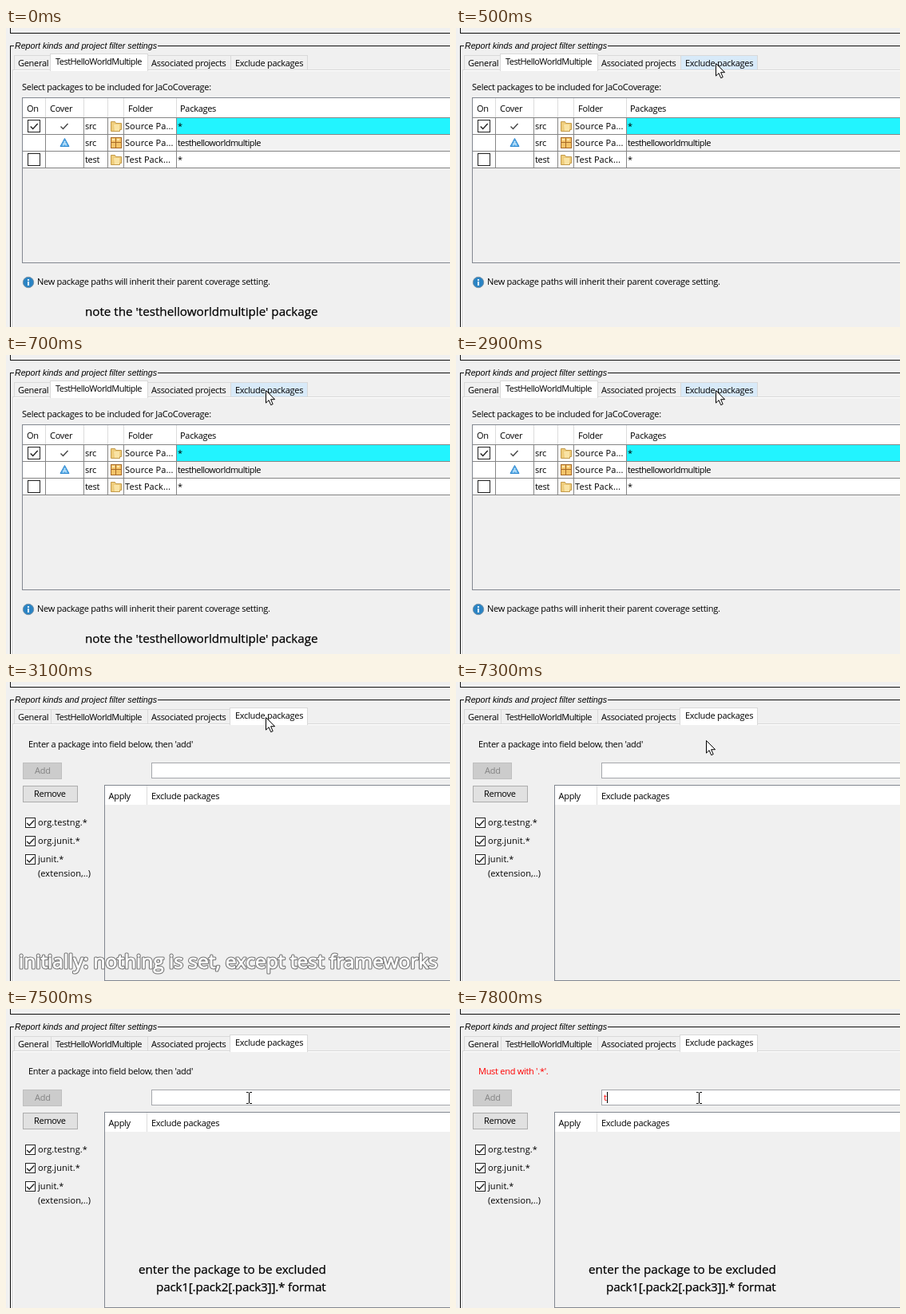
These frames come from a looping animation (556x375 px, 8 s). An HTML page:

```html
<!DOCTYPE html>
<html lang="en">
<head>
<meta charset="utf-8">
<title>Coverage package settings</title>
<style>
  html, body { margin: 0; width: 100%; height: 100%; overflow: hidden; background: #f0f0f0; }
  svg { display: block; }
  rect { shape-rendering: crispEdges; }
  text { font: 11px "Open Sans", "Noto Sans", sans-serif; letter-spacing: -.28px; white-space: pre; }
  .tight { letter-spacing: -.53px; }
  .wide { letter-spacing: .08px; }
  .group { font: italic 10.65px "Liberation Sans", Arial, sans-serif; letter-spacing: 0; }
  .note { font-size: 15.2px; letter-spacing: 0; stroke: #000; stroke-width: .25px; }
  .format { letter-spacing: -.18px; }
  .banner { font-size: 24.5px; letter-spacing: 0; stroke: #fff; stroke-width: .8px; stroke-linejoin: round; }
  .halo { stroke: #777; stroke-width: 3px; }
</style>
</head>
<body>
<svg id="stage" width="556" height="375" viewBox="0 0 556 375"></svg>
<script>
const LOOP = 8000;
const stage = document.getElementById('stage');

const box = (x, y, w, h, fill) => `<rect x="${x}" y="${y}" width="${w}" height="${h}" fill="${fill}"/>`;
const hline = (x, y, x2, color) => box(x, y, x2 - x, 1, color);
const vline = (x, y, y2, color) => box(x, y, 1, y2 - y, color);
const frame = (x, y, w, h, fill, edge) => box(x, y, w, h, edge) + box(x + 1, y + 1, w - 2, h - 2, fill);
const text = (x, y, s, cls = '', fill = '#000') =>
  `<text x="${x}" y="${y}" class="${cls}" fill="${fill}">${s}</text>`;
const path = (d, fill, stroke = 'none', width = 1) =>
  `<path d="${d}" fill="${fill}" stroke="${stroke}" stroke-width="${width}"/>`;

const tick = (x, y, color) => path(`M${x} ${y}l3 3 6-6.5`, 'none', color, 1.4);
const checkbox = (x, y, size, on) =>
  frame(x, y, size, size, '#fff', '#222') + (on ? tick(x + size / 2 - 4.3, y + size / 2 + .5, '#222') : '');

const folder = (x, y) =>
  path(`M${x + .5} ${y + 1.5}h5l1 2h7v8h-2v2h-11z`, '#efcd7c', '#c39a4a') +
  path(`M${x + 4} ${y + 5}h7v8h-6z`, '#f9e3a4');
const parcel = (x, y) =>
  frame(x, y, 14, 14, '#f3c469', '#a86a28') + vline(x + 6, y, y + 14, '#a86a28') +
  hline(x, y + 6, x + 14, '#a86a28') + box(x + 2, y + 2, 3, 2, '#fbe5ae') + box(x + 8, y + 2, 3, 2, '#fbe5ae');

const arrow = (x, y) =>
  path(`M${x + .5} ${y + .5}v15.6l3.6-3.4 2.6 6 2.5-1.1-2.6-5.9h5z`, '#fff', '#000');
const ibeam = (x, y) =>
  path(`M${x - 3} ${y + .5}h2.5l1 1 1-1h2.5M${x + .5} ${y + 1}v13M${x - 3} ${y + 14.5}h2.5l1-1 1 1h2.5`, 'none', '#000');

const tabs = [
  [10, 46, 15, 'General'],
  [56, 121, 62, 'TestHelloWorldMultiple', 'tight'],
  [177, 104, 182, 'Associated projects'],
  [281, 96, 287, 'Exclude packages']
];

function chrome(selected, hovered) {
  const edge = '#d9d9d9';
  let s = box(0, 0, 556, 375, '#f0f0f0') +
    vline(5, 0, 7, '#111') + hline(5, 6, 556, '#111') +
    vline(5, 22, 375, '#111') + hline(5, 22, 10, '#111') + hline(190, 22, 556, '#111') +
    text(11, 26, 'Report kinds and project filter settings', 'group');
  tabs.forEach(([x, w, tx, label, cls], i) => {
    if (i !== selected)
      s += frame(x, 34, w + 1, 19, i === hovered ? '#d8eaf9' : '#f0f0f0', edge) + text(tx, 48, label, cls);
  });
  const [x, w, tx, label, cls] = tabs[selected];
  return s + hline(8, 52, 556, edge) + vline(8, 52, 375, edge) +
    hline(9, 53, 556, '#fff') + vline(9, 53, 375, '#fff') +
    frame(x - 1, 32, w + 2, 22, '#fff', edge) + box(x, 52, w, 2, '#fff') +
    text(tx, 46, label, cls);
}

function includePage() {
  const grid = '#858585', rows = [113, 134, 155];
  let s = text(20, 78, 'Select packages to be included for JaCoCoverage:') +
    box(20, 87, 536, 208, '#828790') + box(21, 88, 535, 206, '#f0f0f0') +
    box(21, 88, 535, 87, '#fff') +
    box(214, 113, 342, 20, '#22f4ff') + box(214, 134, 342, 20, '#f2f2f2');
  for (const x of [49, 97, 127, 147, 213])
    s += vline(x, 88, 112, '#dcdcdc') + vline(x, 112, 175, grid);
  for (const y of [112, 133, 154, 175]) s += hline(21, y, 556, grid);
  [[26, 'On'], [55, 'Cover'], [153, 'Folder'], [218, 'Packages']]
    .forEach(([x, label]) => s += text(x, 105, label));
  [['src', 'Source Pa...', '*'], ['src', 'Source Pa...', 'testhelloworldmultiple'], ['test', 'Test Pack...', '*']]
    .forEach(([root, name, pack], i) => {
      const y = rows[i] + 14;
      s += text(99, y, root) + text(149, y, name, 'wide') + text(215, y, pack, i === 1 ? 'tight' : '') +
        (i === 1 ? parcel : folder)(131, rows[i] + 3);
    });
  return s + checkbox(27, 115, 16, true) + checkbox(27, 157, 16, false) + tick(68.5, 123.5, '#444') +
    path('M73.5 138.5l5.5 10h-11z', '#5fb0e8', '#2b86cf') +
    path('M71 145.5h5M72.5 142.5h2M71.5 148l2-5 2 5', 'none', '#d9efff', .8) +
    '<circle cx="28" cy="319" r="6.7" fill="#2b84c4" stroke="#7793a8"/>' +
    box(27, 315, 2, 2, '#fff') + box(27, 318, 2, 5, '#fff') +
    text(39, 322, 'New package paths will inherit their parent coverage setting.');
}

function excludePage(typed) {
  let s = (typed ? text(28, 82, "Must end with '.*'.", '', '#f00')
                 : text(28, 82, "Enter a package into field below, then 'add'")) +
    frame(21, 101, 49, 21, '#ccc', '#bfbfbf') + text(36, 115, 'Add', '', '#838383') +
    frame(21, 130, 69, 21, '#e1e1e1', '#adadad') + text(35, 144, 'Remove') +
    frame(182, 101, 380, 20, '#fff', '#a5a7ac') +
    frame(123, 129, 440, 246, '#f0f0f0', '#828790') + box(124, 130, 432, 24, '#fff') +
    vline(176, 130, 154, '#dcdcdc') +
    text(128.5, 147, 'Apply') + text(182, 147, 'Exclude packages');
  ['org.testng.*', 'org.junit.*', 'junit.*'].forEach((label, i) =>
    s += checkbox(24, 170 + 23 * i, 13, true) + text(40, 180 + 23 * i, label, 'wide'));
  s += text(40, 244, '(extension,..)', 'wide');
  if (typed) s += text(185, 115, 't', '', '#f00') + vline(189, 104, 118, '#000');
  return s;
}

const banner = ['banner halo', 'banner']
  .map(cls => text(16, 359, 'initially: nothing is set, except test frameworks', cls, '#fff')).join('');
const note = text(99, 361, "note the 'testhelloworldmultiple' package", 'note');
const hint = text(166, 332, 'enter the package to be excluded', 'note') +
  text(188, 354, 'pack1[.pack2[.pack3]].* format', 'note format');

const include = chrome(1, -1) + includePage();
const includeHover = chrome(1, 3) + includePage() + arrow(325, 44);
const exclude = chrome(3, -1) + excludePage(false);
const excludeTyped = chrome(3, -1) + excludePage(true);

// Start time of each state and its picture
const states = [
  [0, include + note],
  [500, includeHover],
  [700, includeHover + note],
  [2900, includeHover],
  [3100, exclude + arrow(325, 44) + banner],
  [7300, exclude + arrow(313, 73)],
  [7500, exclude + ibeam(304, 104) + hint],
  [7800, excludeTyped + ibeam(304, 104) + hint]
];

let shown;
const start = performance.now();
function draw() {
  const t = Math.max(0, performance.now() - start) % LOOP;
  const state = states.findLast(([from]) => t >= from);
  if (state !== shown) {
    shown = state;
    stage.innerHTML = state[1];
  }
  requestAnimationFrame(draw);
}
draw();
</script>
</body>
</html>
```
